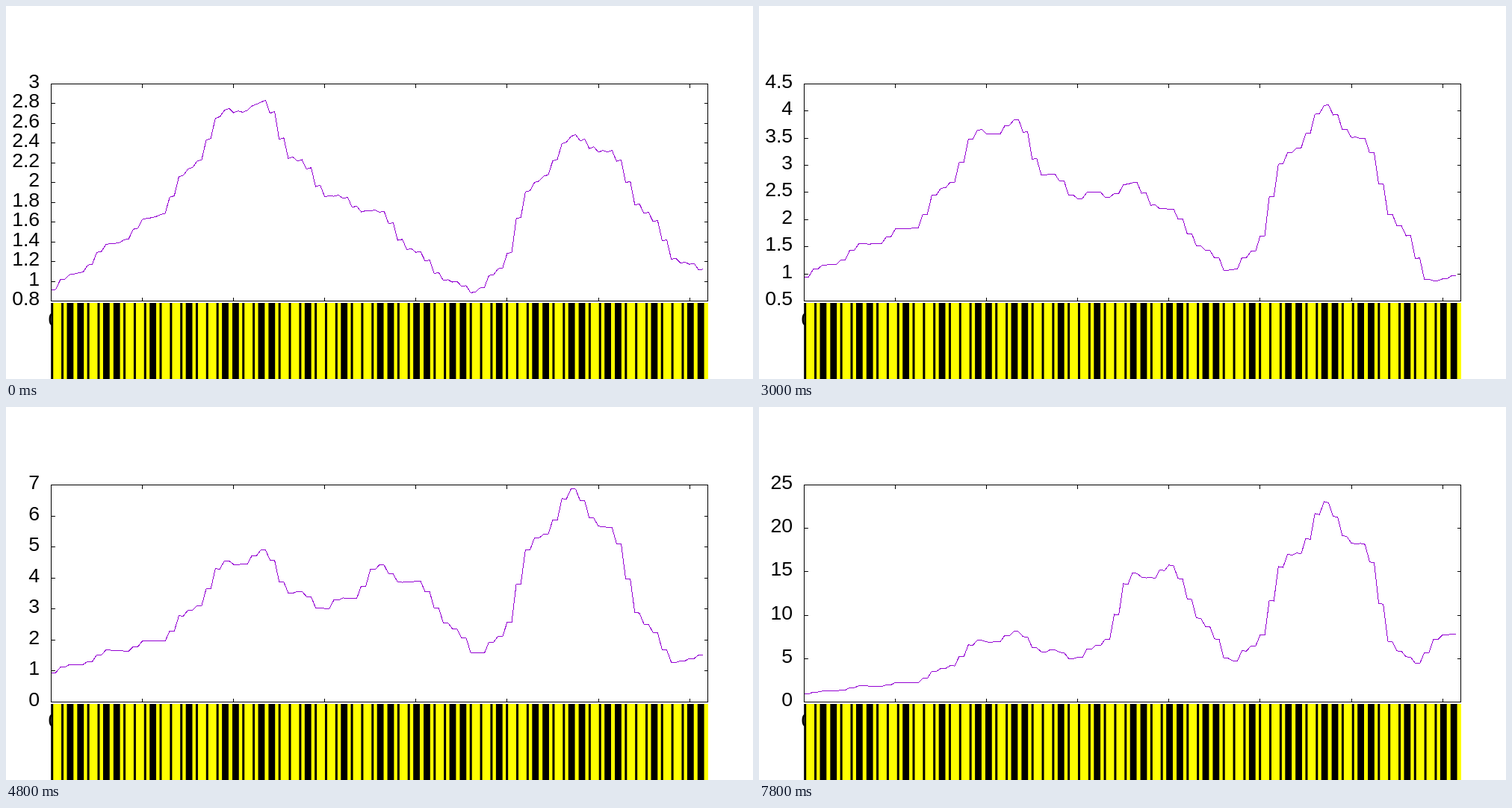
Write an HTML page that moves like this. It is 1000x500 px and loops after 8000 ms.

```html
<!DOCTYPE html>
<html>
<head>
<meta charset="utf-8">
<style>
html, body { margin: 0; width: 100%; height: 100%; overflow: hidden; background: #fff; }
svg { display: block; }
text { font: 26.67px "Liberation Sans", Arial, sans-serif; }
path { fill: none; stroke: #000; shape-rendering: crispEdges; }
#curve { stroke: #9400d3; }
</style>
</head>
<body>
<svg width="1000" height="500" viewBox="0 0 1000 500">
  <path id="curve"/>
  <path id="axes"/>
  <g id="labels" text-anchor="end"></g>
  <text x="64" y="429" text-anchor="middle">0</text>
  <rect x="61" y="398" width="879" height="102" fill="#ff0"/>
  <g id="bars"></g>
</svg>
<script>
const $ = id => document.getElementById(id);
const LEFT = 60.5, RIGHT = 939.5, TOP = 104.5, BOTTOM = 395.5;
const STEP = 600, LOOP = 8000, LAST = Math.floor(LOOP / STEP);
const PAIRS = 72;
const RATE = Math.sqrt(5) - 2; // quasi-periodic: one stair per 4.24 pairs
const HALF = 7 / 13;

const siteX = n => LEFT + n * (RIGHT - LEFT) / (2 * PAIRS);
const snap = v => Math.round(v - .5) + .5;

// Key points of the smooth curve: pair, then log height at the start, halfway and at the end
const keys = [
  [0, -.08, -.02, -.02], [6, .29, .44, .56], [12, .55, .71, .88], [18, .95, 1.34, 1.82],
  [23, 1.01, 1.455, 2.03], [27, .78, 1.15, 1.74], [31, .61, 1.05, 1.73], [36, .5, 1.255, 2.65],
  [42, .1, .945, 2.54], [47, -.08, .31, 1.58], [52, .6, 1.34, 2.66], [57, .88, 1.69, 3.07],
  [62, .77, 1.4, 2.7], [66, .43, .6, 1.56], [69, .17, .06, 1.9], [72, .1, .5, 2.25]];

// Parabola in time through the three log heights
const blend = ([, start, mid, end], t) => start
  + (mid - start) * t * (1 - t) / (HALF * (1 - HALF))
  + (end - start) * t * (t - HALF) / (1 - HALF);

// Cubic through the points, each tangent taken from the neighbours
function spline(points, x) {
  const top = points.length - 1;
  const i = Math.max(0, points.findIndex(p => p[0] > x) - 1);
  const slope = j => {
    const a = points[Math.max(0, j - 1)], b = points[Math.min(top, j + 1)];
    return (b[1] - a[1]) / (b[0] - a[0]);
  };
  const [x0, y0] = points[i], [x1, y1] = points[i + 1];
  const w = x1 - x0, s = (x - x0) / w, r = 1 - s;
  return r * r * (1 + 2 * s) * y0 + s * s * (1 + 2 * r) * y1
    + w * s * r * (r * slope(i) - s * slope(i + 1));
}

// The smooth curve is bent into stairs; both sites of a pair are almost level
function heights(t) {
  const points = keys.map(key => [key[0], blend(key, t)]);
  const ripple = .025 + .045 * t, tilt = 1 + .007 * (1 - t / HALF);
  const out = [];
  for (let k = 0; k < PAIRS; k++) {
    const phase = 2 * Math.PI * RATE * (k - 1.83);
    const v = Math.exp(spline(points, k - .4 * Math.sin(phase)) + ripple * Math.cos(phase));
    out.push(v, v * tilt);
  }
  return out;
}

function ticGap(range) {
  const power = 10 ** Math.floor(Math.log10(range));
  const room = 20 * power / range;
  return power * (room > 10 ? .2 : room > 4 ? .5 : 1);
}

function draw(step) {
  const values = heights(step / LAST);
  const low = Math.min(...values), high = Math.max(...values);
  const gap = ticGap(high - low);
  const from = Math.floor(low / gap), to = Math.ceil(high / gap);
  const toY = v => BOTTOM - (v / gap - from) / (to - from) * (BOTTOM - TOP);
  $("curve").setAttribute("d", "M" + values.map((v, n) => siteX(n).toFixed(2) + " " + toY(v).toFixed(2)).join("L"));

  let axes = `M${LEFT} ${TOP}H${RIGHT}V${BOTTOM}H${LEFT}Z`, labels = "";
  for (let n = 20; n < 2 * PAIRS; n += 20) {
    const x = snap(siteX(n));
    axes += `M${x} ${TOP}v5M${x} ${BOTTOM}v-5`;
  }
  for (let i = from; i <= to; i++) {
    const y = snap(toY(i * gap) - .01);
    axes += `M${LEFT} ${y}h5M${RIGHT} ${y}h-5`;
    labels += `<text x="45.2" y="${y + 5.5}">${+(i * gap).toFixed(1)}</text>`;
  }
  $("axes").setAttribute("d", axes);
  $("labels").innerHTML = labels;
}

// One bar per pair, thick or thin by the same rate; unlike neighbours stand closer
function drawBars() {
  const isThick = k => (k + 1) * RATE % 1 >= (Math.sqrt(5) - 1) / 2;
  let x = 61.7, bars = "";
  for (let k = 0; k < PAIRS; k++) {
    const w = isThick(k) ? 8.8 : 3;
    bars += `<rect x="${(x - w / 2).toFixed(2)}" y="398" width="${w}" height="102"/>`;
    x += isThick(k) === isThick(k + 1) ? 13.84 : 10.38;
  }
  $("bars").innerHTML = bars;
}

let start, shown = 0;
function tick(now) {
  start ??= now;
  const step = Math.floor((now - start) % LOOP / STEP);
  if (step !== shown) draw(shown = step);
  requestAnimationFrame(tick);
}
drawBars();
draw(0);
requestAnimationFrame(tick);
</script>
</body>
</html>
```
